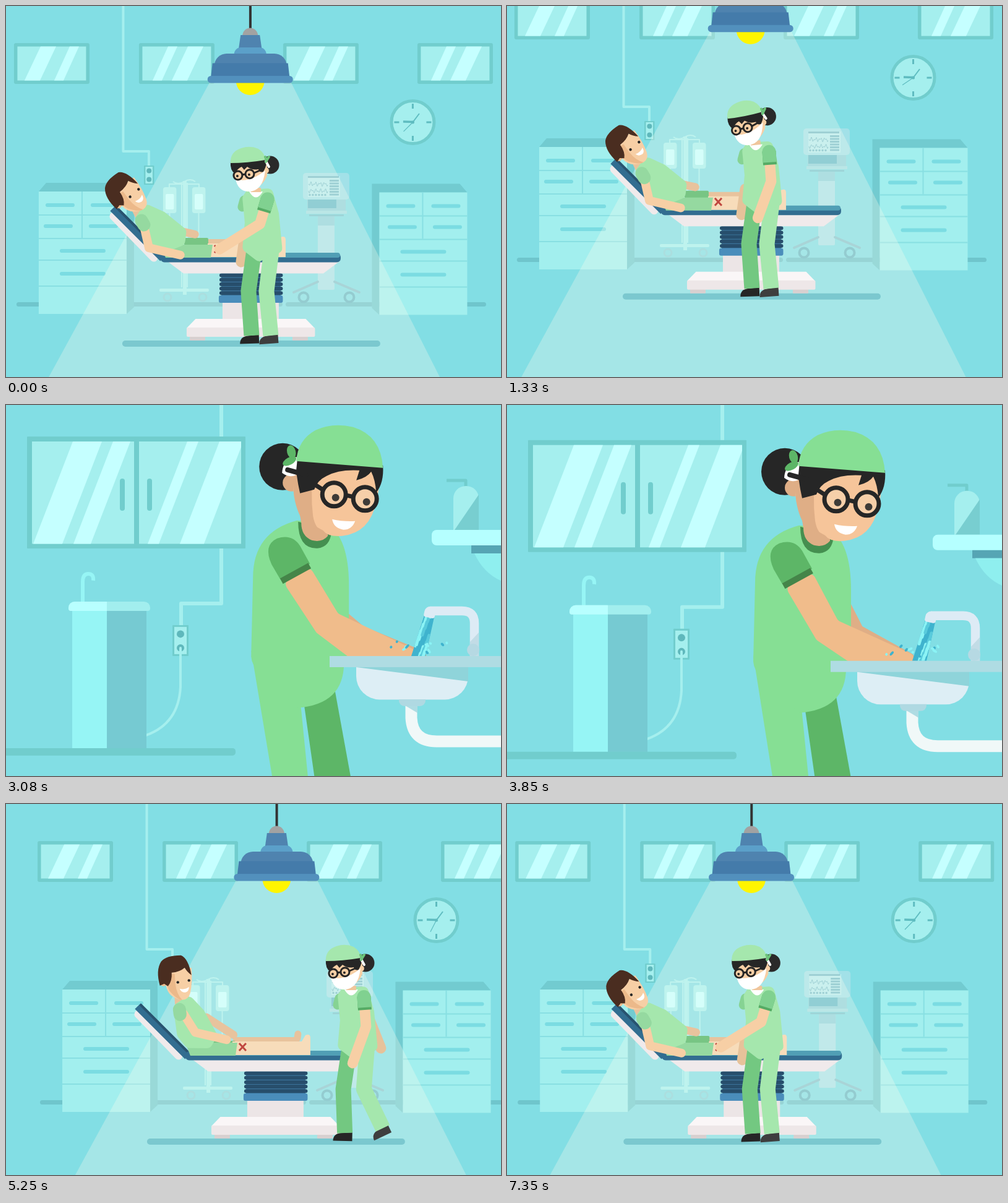
An HTML page with a canvas for the animation above (7.42 s loop, 800 by 600 pixels).

```html
<!DOCTYPE html>
<html lang="en">
<head>
<meta charset="utf-8">
<title>Operating room</title>
<style>
html, body { margin: 0; width: 100%; height: 100%; overflow: hidden; background: #82dee4; }
canvas { display: block; width: 800px; height: 600px; }
</style>
</head>
<body>
<canvas id="stage" width="800" height="600"></canvas>
<script>
const c = document.getElementById('stage').getContext('2d');
const LOOP = 7.42, STEP = 0.07, WASH_START = 1.47, WASH_END = 4.83, RAD = Math.PI / 180;
const WALL = '#82dee4', EDGE = '#71cdcd', PALE = '#a5efee', SHINE = '#c5ffff';
const INK = '#262626', SKIN = '#f7cfa5', SKIN2 = '#e8c39d';
const GREEN = '#a5e7ad', GREEN2 = '#73c881', GREEN3 = '#95d9a0';

const clamp = (v, a = 0, b = 1) => Math.min(b, Math.max(a, v));
const lerp = (a, b, k) => a + (b - a) * k;
const smooth = (a, b, v) => { const k = clamp((v - a) / (b - a)); return k * k * (3 - 2 * k); };
const wave = (t, period) => (1 - Math.cos(t * 2 * Math.PI / period)) / 2;
const polar = (x, y, deg, len) => [x + Math.cos(deg * RAD) * len, y + Math.sin(deg * RAD) * len];

function fill(col) { c.fillStyle = col; c.fill(); }
function rect(x, y, w, h, col, r = 0) { c.beginPath(); c.roundRect(x, y, w, h, r); fill(col); }
function disc(x, y, r, col) { c.beginPath(); c.arc(x, y, r, 0, 7); fill(col); }
function oval(x, y, rx, ry, rot, col) { c.beginPath(); c.ellipse(x, y, rx, ry, rot, 0, 7); fill(col); }
function ring(x, y, r, w, col) { c.beginPath(); c.arc(x, y, r, 0, 7); c.lineWidth = w; c.strokeStyle = col; c.stroke(); }
function path(d, col) { c.fillStyle = col; c.fill(new Path2D(d)); }
function trace(d, w, col, cap = 'butt') {
  c.lineWidth = w; c.strokeStyle = col; c.lineCap = cap; c.lineJoin = 'round';
  c.stroke(new Path2D(d));
}
function limb(pts, w, col, cap = 'round') { trace('M' + pts.join('L'), w, col, cap); }
function at(x, y, draw, rot = 0, px = 0, py = 0) {
  c.save();
  c.translate(x + px, y + py);
  c.rotate(rot * RAD);
  c.translate(-px, -py);
  draw();
  c.restore();
}
// rounded corners: each corner arc ends halfway along its edge
function poly(pts, col, r) {
  const end = pts[pts.length - 1];
  c.beginPath();
  c.moveTo((end[0] + pts[0][0]) / 2, (end[1] + pts[0][1]) / 2);
  pts.forEach(([x, y], i) => {
    const q = pts[(i + 1) % pts.length];
    c.arcTo(x, y, (x + q[0]) / 2, (y + q[1]) / 2, r);
  });
  c.closePath();
  fill(col);
}
// symmetric trapezoid around a centre line
function taper(cx, y, h, top, bottom, col) {
  path(`M${cx - top / 2} ${y}h${top}L${cx + bottom / 2} ${y + h}h${-bottom}Z`, col);
}
function slant(x, w, top, bottom, run) {
  path(`M${x} ${bottom}L${x + run} ${top}h${w}L${x + w} ${bottom}Z`, SHINE);
}
function arm(x, y, upper, lower, len1, len2, w, col) {
  const elbow = polar(x, y, upper, len1);
  limb([[x, y], elbow, polar(...elbow, lower, len2)], w, col);
}

/* ---------- operating room ---------- */

function roomWindow(x, wideFirst) {
  rect(x, 60, 122, 66, EDGE, 3);
  rect(x + 5.5, 65.5, 111, 55, PALE);
  slant(x + (wideFirst ? 17 : 53), 25, 65.5, 120.5, 26);
  slant(x + (wideFirst ? 65 : 22), 15, 65.5, 120.5, 25);
}

function cabinet(x, y, depth, step) {
  const side = depth > 0 ? x + 142 : x, line = '#88dfe2';
  path(`M${x} ${y}l${depth} -14h142l${-depth} 14ZM${side} ${y}l${depth} -14v201l${-depth} 11Z`, '#72cbd0');
  rect(x, y, 142, 198, '#a2efee');
  [37, 75, 110, 152].forEach(d => rect(x, y + d, 142, 2, line));
  rect(x + 69, y, 2, 75, line);
  for (let i = 0; i < 4; i++) {
    const row = i >> 1;
    rect(x + 11 + i % 2 * 73 + row * step, y + 19 + row * 34, 47, 6, '#7bdce2', 3);
  }
  for (let i = 0; i < 2; i++) rect(x + 34, y + 93 + i * 37, 74, 6, '#7bdce2', 3);
}

function clock(sec) {
  const hand = '#5fbcc0';
  at(657.5, 188, () => {
    disc(0, 0, 34.5, PALE);
    ring(0, 0, 34.5, 5, EDGE);
    for (let i = 0; i < 4; i++) at(0, 0, () => rect(-1.5, -30, 3, 8, hand), i * 90);
    trace('M0 0L10.5 -14', 2, hand);
    trace('M0 -.5L-15.5 -1', 3.5, hand);
    at(0, 0, () => rect(0, -.6, 21, 1.2, hand), sec);
    disc(0, 0, 2.5, hand);
  });
}

function drip() {
  trace('M284 455V286M293 455V286M264 293V288H312V293M270 284Q278 290 288 284T306 284', 2, PALE);
  rect(286, 283, 6, 184, PALE);
  rect(248, 457, 80, 5, PALE, 2);
  for (const x of [254, 301]) {
    rect(x, 293, 21.5, 42, PALE, 4);
    rect(x + 4, 304, 13.5, 25, SHINE, 2);
    trace(`M${x + 10.5} 335v${x - 239}`, 2, PALE);
    ring(x + (x < 288 ? 7 : 17), 471, 6, 3, '#8bd3d9');
  }
}

function monitor() {
  const ink = '#79bfca';
  rect(504, 340, 27, 119, '#a9e2e8', 2);
  rect(504, 340, 27, 15, '#8ed3dc');
  trace('M504 446L465 463M531 446L571 463', 4, '#87c4ce', 'round');
  [481, 555].forEach(x => ring(x, 471, 7.5, 4, '#6ab9c4'));
  rect(487, 312, 62, 19, '#8fd2da');
  rect(488, 313, 46, 14, '#67bcca');
  rect(485, 331, 66, 5, '#9fdde3');
  rect(490, 337, 56, 3, '#78c6d0');
  rect(480, 270, 75, 43, '#a2e1e8', 5);
  rect(488, 275, 52, 34, '#b5ebee');
  rect(488, 275, 50, 3, ink);
  for (let r = 0; r < 2; r++) {
    c.beginPath();
    for (let x = 0; x < 32; x++) c.lineTo(489 + x, 288 + r * 11 + 4 * Math.sin(x * 1.2) * Math.sin(x * .35 + r));
    c.lineWidth = 1; c.strokeStyle = ink; c.stroke();
  }
  for (let i = 0; i < 6; i++) {
    rect(523, 281 + i * 4.5, 15, 3, ink);
    disc(491 + i * 5, 305.5, 1.7, ink);
  }
}

function room(sec) {
  trace('M189.5 -20V235H231V260', 4, PALE);
  [13, 215, 448, 665].forEach((x, i) => roomWindow(x, i % 2 === 0));
  rect(223, 258, 16.5, 31, EDGE, 1);
  rect(225.5, 260, 11.5, 27, PALE);
  [266.5, 280.5].forEach(y => disc(231.3, y, 4, '#5fb8bc'));
  clock(sec);
  rect(17, 479, 430, 7, '#6fc5cc', 3.5);
  rect(452, 479, 324, 7, '#6fc5cc', 3.5);
  cabinet(53, 300, 12, -3);
  cabinet(603.5, 301.5, -12, 2.5);
  drip();
  monitor();
}

function cone() {
  path('M329 124H461L804 804H-42Z', 'rgba(255,252,238,.28)');
}

function lamp() {
  const x = 394.8;
  rect(x - 1.8, -60, 4, 97, '#333');
  disc(x, 121, 23, '#fff500');
  disc(x, 48, 12.5, '#a2a2a2');
  taper(x, 47, 21, 31, 37, '#4f83af');
  rect(x - 26, 67, 52, 15, '#5ba0c9', [11, 11, 0, 0]);
  rect(x - 58, 77, 117, 20, '#4f83af', [22, 22, 0, 0]);
  taper(x, 92.5, 22, 122, 127, '#447baa');
  rect(x - 69, 113, 138, 11.5, '#5290bd', 5.5);
}

function table() {
  const white = '#f0eaeb', blue = '#326d90';
  rect(188, 541, 417, 10, '#7bc8cf', 5);
  [297, 463].forEach(x => rect(x, 534, 25, 7, '#d8d0d0', 1));
  rect(350, 478, 91, 30, '#ece5e6');
  taper(395.5, 506, 15, 178, 207, '#faf6f7');
  rect(292, 520, 207.5, 15, '#eee7e8', 2);
  rect(348, 432, 96, 38, '#3b7299');
  for (let i = 0; i < 5; i++) rect(345, 432.5 + i * 7.2, 102.5, 6, '#274e6c', 3);
  rect(344, 468, 103.5, 12, '#4a8dbb', 3);
  taper(400, 413, 19.5, 278, 226, white);
  limb([[174, 340], [239, 407]], 13, white);
  limb([[173, 327], [254, 408]], 13, blue, 'butt');
  limb([[177, 324], [257, 404]], 4, '#28536f', 'butt');
  rect(250, 400, 291, 14.5, blue, 6);
  rect(300, 399, 240, 8, '#519fb5', 4);
}

function patientHead() {
  disc(-32, 2, 6, '#eebd8e');
  path('M-26 -20L13 -22Q15 2 11 19Q8 30 -2 30Q-24 27 -28 8Z', SKIN);
  path('M-26 -12Q-28 8 -22 16Q-10 30 -2 30Q-11 21 -13 4L-14 -12Z', '#ecb98a');
  path('M-31 4L-38 7Q-45 -18 -36 -32Q-28 -42 -4 -42Q8 -37 13 -10Q6 -15 2 -22Q-6 -15 -19 -14Q-18 0 -25 8Z', '#4a2d20');
  disc(-9, 1.5, 2.2, INK);
  disc(9, -1.5, 2.2, INK);
  path('M-6 12Q3 14 9 9Q9 17 3 18Q-4 18 -6 12Z', '#fff');
}

function patient(sit) {
  rect(327, 377, 107, 9, SKIN2);
  limb([[432, 372], [431, 379]], 11, SKIN2);
  rect(288, lerp(375, 383, sit), lerp(39, 43, sit), 12, '#78c584', 2);
  path('M326 384H438L444 374Q452 371 452 378V406H326Z', '#f7dcba');
  trace('M337 387L348 399M348 387L337 399', 3, '#c0473f');
  arm(lerp(276, 284, sit), lerp(363, 345, sit), lerp(12, 33, sit), lerp(12, 33, sit), 14, lerp(16, 38, sit), 13, SKIN2);
  path('M250 386H334L331 407H258Z', GREEN3);
  // upper body turns around the hip
  at(3 * sit, 2 * sit, () => {
    limb([[211, 324], [219, 341]], 19, SKIN2);
    poly([[225, 319], [256, 333], [292, 362], [289, 386], [254, 400], [232, 388], [207, 345]], GREEN, 10);
  }, 22.5 * sit, 270, 385);
  arm(lerp(223, 247, sit), lerp(356, 339, sit), lerp(77, 58, sit), 13, 36, 52, 14, SKIN);
  at(3 * sit, 2 * sit, () => {
    limb([[219, 347], [223, 354]], 21, GREEN3);
    at(207.5, 302.5, patientHead, lerp(-32, -22.5, sit));
  }, 22.5 * sit, 270, 385);
}

function leg(hip, knee, ankle, lift, col, shoeCol, turn) {
  at(ankle - 1, 538 - lift, () => path('M-18 8Q-18 -4 -4 -5L13 -6V8Z', shoeCol), turn);
  limb([[hip, 388], [knee, 461], [ankle, 533 - lift]], 25, col, 'butt');
}

function doctorHead() {
  limb([[404, 294], [404, 301]], 16, '#f0c59b', 'butt');
  disc(427, 257, 14.6, '#2a2a2a');
  path('M366 252H422V275Q412 298 388 296Q367 290 366 252Z', SKIN);
  disc(420, 266, 5, SKIN);
  path('M363 252L421 247Q423 256 416 268Q410 270 408 264Q398 266 390 260L385 265L381 260Q375 262 370 271Q362 266 363 252Z', INK);
  path('M371 280Q393 287 419 266Q415 301 391 300Q375 299 371 280Z', '#fff');
  for (const x of [375, 394]) {
    const y = 274 - (x - 375) * .12;
    disc(x, y, 7, SKIN);
    ring(x, y, 7, 3, INK);
    disc(x - 1, y + 1, 2, INK);
  }
  trace('M381 273L387 272M401 270L417 263', 3, INK);
  path('M363 254Q362 236 380 230Q395 225 408 231Q419 238 419 249Q390 254 363 254Z', GREEN);
  trace('M420 251L425 260', 4, '#fff', 'round');
  trace('M420 252L425 244M421 248L419 244', 4, '#6cc47b', 'round');
}

function doctor(walk, reach, tilt, lean, t) {
  const ph = (t - 5.25) * Math.PI * 2 / .8;
  const near = 27 * walk * Math.cos(ph), far = 22 * walk * Math.sin(ph - .15);
  const upper = lerp(86, 107, reach), sx = lerp(425, 421, reach), sy = 318;
  limb([[lerp(386, 432, walk), lerp(372, 345, walk)], [lerp(380, 452, walk), lerp(414, 395, walk)]], 17, '#e6c29a');
  leg(402, 392 + far / 4, 397 + far, Math.abs(far) * .3, GREEN2, INK, -far - 2);
  leg(430, 421 + near / 8, 428 + near, Math.abs(near) * .32, GREEN, '#3e3e3e', -near * .8 - 4);
  at(lean, 0, () => {
    limb([[385, 314], [382, 325]], 15, '#86d393');
    poly([[390, 297], [430, 295], [441, 335], [447, 397], [408, 414], [382, 394], [386, 350], [382, 309]], GREEN, 9);
    path('M393 300Q404 319 415 300Z', '#fff');
    at(0, 0, doctorHead, tilt, 405, 300);
  });
  arm(sx, sy, upper, lerp(110, 148, reach), lerp(42, 36, reach), lerp(63, 77, reach), 17, SKIN);
  limb([polar(sx, sy, upper, -7), polar(sx, sy, upper, 15)], 22, '#55ab64', 'butt');
  limb([polar(sx, sy, upper, -7), polar(sx, sy, upper, 11)], 22, '#80d190', 'butt');
  disc(...polar(sx, sy, upper, -6), 11, '#80d190');
}

function operating(t) {
  const u = t > WASH_START ? t : t + LOOP;
  const x = 4.57 * Math.pow(Math.max(0, 7.9 - u), 2.2) - 1;
  const y = -72 * Math.pow(Math.max(0, u - 7.92) / .83, 2.5);
  const sit = clamp(Math.pow(Math.max(0, 7 - u) / 1.75, 3));
  const dx = 114 * Math.pow(Math.max(0, 6.15 - u) / .9, 1.5);
  const reach = smooth(6.45, 7.15, u) * (1 - smooth(7.85, 8.45, u));
  const bow = smooth(7.8, 8.5, u);
  const lean = 4 * smooth(5.9, 6.2, u) * (1 - smooth(6.4, 7.1, u)) - bow;
  const layer = (k, draw, extra = 0) => at(x * k + extra, y * lerp(1, k, 1.2), draw);
  layer(1, () => room(135 + 8.2 * (u - LOOP)));
  layer(1.12, cone);
  layer(1.05, () => { table(); patient(sit); });
  layer(1.05, () => doctor(clamp(dx / 114), reach, -6 * bow, lean, u), dx);
  layer(1.12, lamp);
}

/* ---------- washing hands ---------- */

function washWall() {
  trace('M348 -60V327H283V364', 6, PALE);
  rect(34, 57, 353, 181, EDGE, 1);
  [42, 215].forEach(x => rect(x, 65, 165, 165.5, PALE));
  slant(44, 47, 65, 230.5, 64);
  slant(109, 28, 65, 230.5, 64);
  slant(229, 18, 65, 230.5, 64);
  path('M281 230.5L345 65H380V74L320 230.5Z', SHINE);
  [184, 228].forEach(x => rect(x, 125, 8, 52, EDGE, 4));
  rect(269, 362, 26, 50, EDGE, 1);
  rect(272, 365, 20, 44, PALE);
  [376.5, 399].forEach(y => disc(282, y, 6, '#5fb8bc'));
  trace('M282 399V462Q279 521 227 540', 4, PALE, 'round');
  trace('M124 326V292Q124 279 133 279Q142 279 141 290', 6, '#96f5f5');
  rect(107, 338, 56, 224, '#96f5f5');
  rect(163, 338, 64, 224, '#76cad2');
  rect(101, 324, 132, 15, '#a2eeee', [10, 10, 4, 4]);
  rect(101, 324, 62, 15, '#b8ffff', [10, 0, 0, 4]);
  rect(-10, 561, 381, 12, EDGE, 5);
}

function shelf() {
  trace('M712 130H743V142', 5, EDGE);
  rect(723, 139, 41, 71, PALE, [20, 20, 0, 0]);
  path('M764 153V210H725Z', '#78ced0');
  rect(752, 234, 60, 14, '#56a5b4');
  path('M757 248H810V296Q774 285 757 248Z', '#8fefef');
  rect(688, 210, 130, 25, '#b5ffff', 8);
}

function washerHead(skin, shade, cap, bow) {
  path('M468 130H522V220Q513 231 496 227Q479 220 479 199Z', shade);
  disc(449, 108, 38, INK);
  disc(463, 134, 14, shade);
  path('M470 100L606 108Q606 145 600 165Q590 215 545 220Q522 222 514 211Q470 190 466 145Z', skin);
  path('M468 104L500 105Q493 150 498 188Q502 210 514 211Q497 211 481 195Q467 171 466 140Z', shade);
  path('M470 96L611 106Q613 134 600 150Q599 130 592 116Q585 126 568 130L573 114Q540 112 520 123Q505 130 500 145L477 151Q470 120 470 96Z', INK);
  path('M448 118Q449 101 463 91L473 93L470 122Q458 126 448 118Z', '#fff');
  trace('M457 113L486 121', 8, INK, 'round');
  path('M471 99Q473 65 502 49Q530 36 563 44Q608 58 611 110Z', cap);
  oval(463, 84, 7, 11, -.25, bow);
  oval(460, 99, 12, 6, -.5, bow);
  trace('M501 137L515 146M551 154L565 157', 7, INK);
  for (const x of [532, 582]) {
    const y = 153 + (x - 532) * .14;
    disc(x, y, 19, '#f6cfa9');
    ring(x, y, 19, 7, INK);
    disc(x + 2.5, y + 5, 6, '#3d3b38');
  }
  path('M529 193Q546 197 566 196Q561 210 547 210Q531 207 529 193Z', '#fff');
}

function washer(bob, rub) {
  const green = '#86df94', dark = '#5db667', skin = '#f6c59a', shade = '#dfae86';
  const sway = -3 * rub;
  const body = draw => at(sway, bob, draw);
  path('M480 480L528 450L559 620H500Z', dark);
  path(`M${398 + sway} 405L475 480L489 620H432Z`, green);
  arm(lerp(545, 520, rub), lerp(325, 350, rub), lerp(63, 25, rub), lerp(29, 18, rub), lerp(46, 61, rub), lerp(94, 111, rub), 22, shade);
  body(() => {
    path('M472 195Q401 214 401 287L398 415Q399 430 412 440L472 498Q548 493 548 425L556 407V300Q556 222 520 200Z', green);
    path('M474 197Q474 241 505 240Q526 238 528 212Z', '#458f50');
    washerHead(skin, shade, green, dark);
  });
  const elbow = 380 + bob / 2 - 6 * rub, tip = 657 + 6 * rub;
  poly([[450 + sway, 295 + bob], [493 + sway, 270 + bob], [535 + 3 * rub, elbow - 31], [tip, 404], [tip, 424], [565, 424], [500 + 3 * rub, elbow]], '#f0bc8b', 9);
  body(() => {
    path('M445 290L431 266Q417 235 440 224Q464 216 477 236L493 265Z', dark);
    limb([[447, 293], [492.5, 268]], 10, '#458549', 'butt');
  });
}

function water(t) {
  c.save();
  c.clip(new Path2D('M677 345L693 347L678 414H655Z'));
  rect(650, 340, 50, 80, '#3fb3ce');
  for (let i = 0; i < 22; i++) {
    const f = (i * .381 + t * 2.4) % 1, s = (i * 7 % 11) / 10 - .5;
    const x = lerp(685, 666, f) + s * (13 + 9 * f), y = 340 + f * 76;
    trace(`M${x} ${y}l-3 10`, 5, i % 3 ? '#8bf3f5' : '#59cbdc', 'round');
  }
  c.restore();
  for (let i = 0; i < 12; i++) {
    const age = t * 1.9 + i * .29, k = age % 1, dir = Math.sin(i * 4.7 + Math.floor(age) * 2.1);
    const x = 667 + dir * (15 + 42 * k), y = 409 - 85 * k * (1 - k) * (.45 + .5 * Math.abs(dir));
    oval(x, y, 2.2 + i % 3, 2, dir, i % 2 ? '#8bf3f5' : '#3fb3ce');
  }
}

function sink(t) {
  rect(566, 420, 181, 64.5, '#ddeef5', [0, 0, 38, 38]);
  path('M566 430H747V455L566 432Z', '#8fd4da');
  trace('M655 493V514Q657 552 696 552H820', 19, '#f0f8f8');
  path('M645 494H665V506Z', '#afdce3');
  rect(635, 484, 43, 11, '#afd9e2', [0, 0, 9, 9]);
  water(t);
  trace('M685 341H737Q757 341 757 361V414', 14.5, '#ddebf5');
  at(685, 344, () => rect(-9, -10, 18, 18, '#ddebf5', [9, 3, 4, 4]), 12);
  path('M764 376V414H750V391Z', '#c2dce6');
  disc(755, 404, 10, '#b6d9e3');
  rect(523, 414, 290, 18, '#afdce3');
}

function washing(t) {
  const s = t - WASH_START;
  const y = 5.8 + 130 * Math.exp(-5 * s) - 113 * s * Math.exp(-1.6 * s);
  at(0, y * .765, washWall);
  at(0, y, () => {
    shelf();
    washer(-10 * wave(t - 3.85, .805), wave(t - 3.85, 1.073));
    sink(t);
  });
}

const start = performance.now();
function frame() {
  const s = (performance.now() - start) / 1000 % LOOP;
  const t = Math.floor(s / STEP + 1e-6) * STEP;
  c.fillStyle = WALL;
  c.fillRect(0, 0, 800, 600);
  if (t >= WASH_START - 1e-6 && t < WASH_END) washing(t);
  else operating(t);
  requestAnimationFrame(frame);
}
frame();
</script>
</body>
</html>
```
